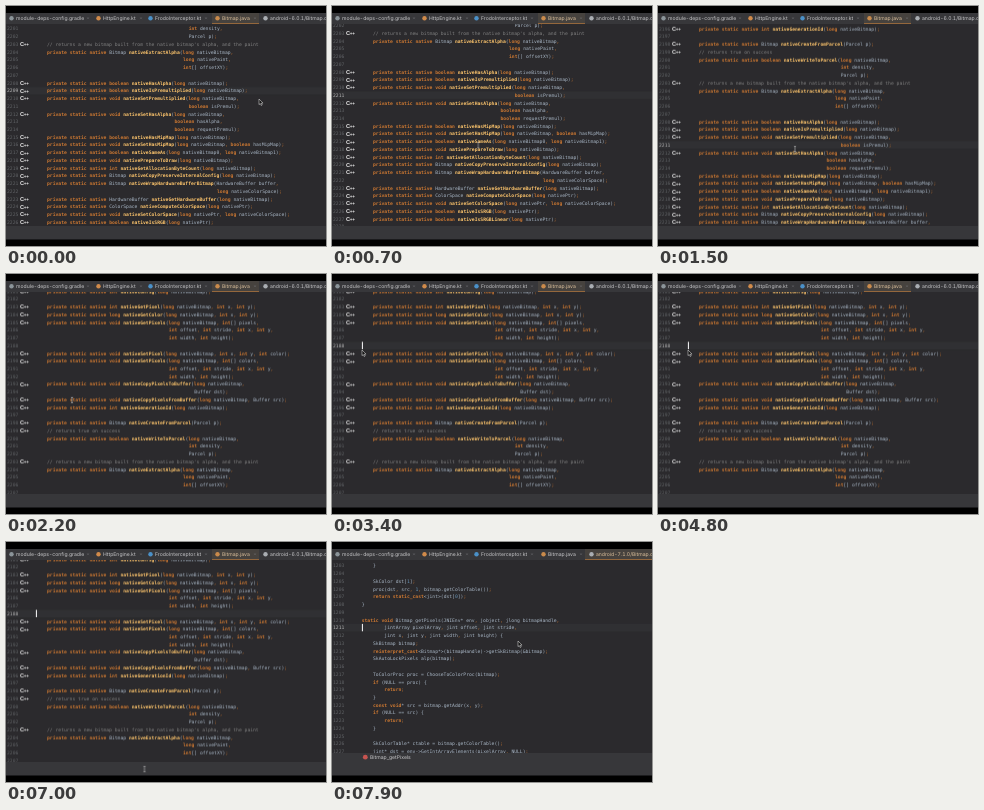
Recreate the animation shown at these times as an HTML page. Size 320 by 240 pixels, loop 8 s.

```html
<!DOCTYPE html>
<html lang="en">
<head>
<meta charset="utf-8">
<title>Code editor</title>
<style>
html, body { margin: 0; width: 100%; height: 100%; overflow: hidden; background: #000; }
svg { display: block; width: 100vw; height: 100vh; }
text { text-rendering: geometricPrecision; fill: #a9b7c6; }
.mono { font: 4.706px "DejaVu Sans Mono", monospace; }
.ui text { font: 5.1px Inter, Roboto, sans-serif; font-variant-numeric: tabular-nums; fill: #c8c8ca; }
.ui .item { font-size: 5.5px; }
.ui .active { fill: #dcc09c; }
.num { fill: #606366; }
.key { fill: #cc7832; font-weight: bold; }
.sep { fill: #cc7832; }
.fn { fill: #ffc66d; font-weight: bold; }
.rem { fill: #808080; }
.lit { fill: #6897bb; }
.cpp { font: bold 5.6px "Liberation Sans", sans-serif; letter-spacing: -.3px; fill: #eee; }
.plus { font-size: 4.6px; }

#scroll, #row, #caret, #pick, #mouse, #popup, .before, .after, .arrow, .beam, .num {
  animation: 8s linear infinite;
}
#row, #caret, #popup, .before, .after, .arrow, .beam, .num { animation-timing-function: step-end; }
#scroll { animation-name: scroll; }
#row { animation-name: row; }
#caret { animation-name: caret; }
#popup { animation-name: popup; }
#pick { animation-name: pick; }
#mouse { animation-name: mouse; }
.before { animation-name: before; }
.after { animation-name: after; }
.arrow { animation-name: arrow; }
.beam { animation-name: beam; }

@keyframes scroll {
  0%, 3.75% { transform: translateY(-130.4px); animation-timing-function: ease-in-out; }
  10%, 14% { transform: translateY(-142.4px); animation-timing-function: ease-in-out; }
  26.25%, 100% { transform: translateY(19px); }
}
@keyframes row {
  0% { transform: translateY(216.7px); }
  6.25% { transform: translateY(232.2px); }
  37.5%, 100% { transform: translateY(54.2px); }
}
@keyframes line2209 { 0% { fill: #b4b4b4; } 6.25%, 100% { fill: #606366; } }
@keyframes line2211 { 0% { fill: #606366; } 6.25% { fill: #b4b4b4; } 37.5%, 100% { fill: #606366; } }
@keyframes line2188 { 0% { fill: #606366; } 37.5%, 100% { fill: #b4b4b4; } }
@keyframes line1211 { 0%, 100% { fill: #b4b4b4; } }
@keyframes caret { 0% { opacity: 0; } 37.5%, 100% { opacity: 1; } }
@keyframes popup { 0% { opacity: 0; } 62.5% { opacity: 1; } 81.25%, 100% { opacity: 0; } }
@keyframes pick {
  0%, 73.75% { transform: none; animation-timing-function: steps(8); }
  78.75%, 100% { transform: translateY(70.56px); }
}
@keyframes before { 0% { opacity: 1; } 88.75%, 100% { opacity: 0; } }
@keyframes after { 0% { opacity: 0; } 88.75%, 100% { opacity: 1; } }
@keyframes arrow { 0% { opacity: 1; } 5% { opacity: 0; } 32.5% { opacity: 1; } 82.5% { opacity: 0; } 88.75%, 100% { opacity: 1; } }
@keyframes beam { 0% { opacity: 0; } 5% { opacity: 1; } 32.5% { opacity: 0; } 82.5% { opacity: 1; } 88.75%, 100% { opacity: 0; } }
@keyframes mouse {
  0%, 3.75% { transform: translate(253px, 93px); animation-timing-function: ease-in-out; }
  10%, 25% { transform: translate(137px, 143px); animation-timing-function: ease-in-out; }
  27.5%, 30% { transform: translate(66px, 126px); animation-timing-function: ease-in-out; }
  36.25%, 62.5% { transform: translate(30px, 76px); animation-timing-function: ease-in-out; }
  70%, 73.1% { transform: translate(145px, 96px); animation-timing-function: ease-in-out; }
  78.75%, 81.25% { transform: translate(146px, 161px); animation-timing-function: ease-in-out; }
  86.25%, 88% { transform: translate(138.5px, 227px); }
  90% { transform: translate(182px, 160px); animation-timing-function: ease-out; }
  97.5%, 100% { transform: translate(186px, 99px); }
}
</style>
</head>
<body>
<svg viewBox="0 0 320 240">
  <defs>
    <clipPath id="pane"><rect y="18" width="320" height="202"/></clipPath>
    <clipPath id="shortPane"><rect y="18" width="320" height="193"/></clipPath>
    <clipPath id="window"><rect y="7" width="320" height="226.5"/></clipPath>
  </defs>
  <rect width="320" height="240" fill="#000"/>
  <rect y="7" width="320" height="226.5" fill="#37373a"/>
  <rect y="18" width="320" height="202" fill="#2b2a2d"/>

  <g class="before" clip-path="url(#pane)">
    <g id="scroll" class="mono">
      <g id="row">
        <rect y="-5.5" width="320" height="7.74" fill="#303033"/>
        <rect id="caret" x="29.9" y="-5.4" width="1" height="7.4" fill="#fff"/>
      </g>
      <g id="java"></g>
    </g>
  </g>
  <g class="after">
    <g class="mono" clip-path="url(#shortPane)">
      <rect y="81.8" width="320" height="7.74" fill="#303033"/>
      <rect x="29.9" y="81.9" width="1" height="7.4" fill="#fff"/>
      <g id="native"></g>
    </g>
    <g class="ui">
      <rect y="211" width="320" height="9" fill="#37373a"/>
      <circle cx="33.3" cy="215.2" r="2.4" fill="#c75450"/>
      <text x="38" y="217">Bitmap_getPixels</text>
    </g>
  </g>

  <g id="tabs" class="ui" clip-path="url(#window)">
    <g class="before">
      <rect x="206" y="7" width="47" height="11" fill="#46423e"/>
      <rect x="206" y="17" width="47" height=".8" fill="#a8713c"/>
    </g>
    <g class="after">
      <rect x="253" y="7" width="67" height="11" fill="#46423e"/>
      <rect x="253" y="17" width="67" height=".8" fill="#a8713c"/>
    </g>
  </g>

  <g id="popup" class="ui" clip-path="url(#window)">
    <rect x="122.8" y="75.8" width="61.4" height="170" fill="#3b3c40" stroke="#525357" stroke-width=".5"/>
    <rect x="123" y="76" width="61" height="10.6" fill="#46474b"/>
    <rect id="pick" x="123.5" y="86.8" width="54.5" height="8.82" fill="#2659c6"/>
    <text x="153.7" y="82.9" text-anchor="middle">Choose Version</text>
  </g>

  <g id="mouse">
    <path class="arrow" d="M0 0V5.6L1.3 4.5L2.2 6.5L3.2 6L2.3 4.1H4Z" fill="#111" stroke="#eee" stroke-width=".5"/>
    <path class="beam" d="M-1.1-2.8Q0-2.8 0-2.1Q0-2.8 1.1-2.8M0-2.1V2.4M-1.1 3Q0 3 0 2.3Q0 3 1.1 3" fill="none" stroke="#c4c4c4" stroke-width=".6"/>
  </g>
</svg>
<script>
const PITCH = 7.74, CHAR = 2.833, LEFT = 29.7;

// "#" opens a native declaration, "~" aligns with the parenthesis above.
const javaCode = `#int nativeConfig(long nativeBitmap);

#int nativeGetPixel(long nativeBitmap, int x, int y);
#long nativeGetColor(long nativeBitmap, int x, int y);
#void nativeGetPixels(long nativeBitmap, int[] pixels,
~int offset, int stride, int x, int y,
~int width, int height);

#void nativeSetPixel(long nativeBitmap, int x, int y, int color);
#void nativeSetPixels(long nativeBitmap, int[] colors,
~int offset, int stride, int x, int y,
~int width, int height);
#void nativeCopyPixelsToBuffer(long nativeBitmap,
~Buffer dst);
#void nativeCopyPixelsFromBuffer(long nativeBitmap, Buffer src);
#int nativeGenerationId(long nativeBitmap);

#Bitmap nativeCreateFromParcel(Parcel p);
    // returns true on success
#boolean nativeWriteToParcel(long nativeBitmap,
~int density,
~Parcel p);
    // returns a new bitmap built from the native bitmap's alpha, and the paint
#Bitmap nativeExtractAlpha(long nativeBitmap,
~long nativePaint,
~int[] offsetXY);

#boolean nativeHasAlpha(long nativeBitmap);
#boolean nativeIsPremultiplied(long nativeBitmap);
#void nativeSetPremultiplied(long nativeBitmap,
~boolean isPremul);
#void nativeSetHasAlpha(long nativeBitmap,
~boolean hasAlpha,
~boolean requestPremul);
#boolean nativeHasMipMap(long nativeBitmap);
#void nativeSetHasMipMap(long nativeBitmap, boolean hasMipMap);
#boolean nativeSameAs(long nativeBitmap0, long nativeBitmap1);
#void nativePrepareToDraw(long nativeBitmap);
#int nativeGetAllocationByteCount(long nativeBitmap);
#Bitmap nativeCopyPreserveInternalConfig(long nativeBitmap);
#Bitmap nativeWrapHardwareBufferBitmap(HardwareBuffer buffer,
~long nativeColorSpace);
#HardwareBuffer nativeGetHardwareBuffer(long nativeBitmap);
#ColorSpace nativeComputeColorSpace(long nativePtr);
#void nativeSetColorSpace(long nativePtr, long nativeColorSpace);
#boolean nativeIsSRGB(long nativePtr);
#boolean nativeIsSRGBLinear(long nativePtr);
`;

const nativeCode = `    }

    SkColor dst[1];
    proc(dst, src, 1, bitmap.getColorTable());
    return static_cast<jint>(dst[0]);
}

static void Bitmap_getPixels(JNIEnv* env, jobject, jlong bitmapHandle,
        jintArray pixelArray, jint offset, jint stride,
        jint x, jint y, jint width, jint height) {
    SkBitmap bitmap;
    reinterpret_cast<Bitmap*>(bitmapHandle)->getSkBitmap(&bitmap);
    SkAutoLockPixels alp(bitmap);

    ToColorProc proc = ChooseToColorProc(bitmap);
    if (NULL == proc) {
        return;
    }
    const void* src = bitmap.getAddr(x, y);
    if (NULL == src) {
        return;
    }

    SkColorTable* ctable = bitmap.getColorTable();
    jint* dst = env->GetIntArrayElements(pixelArray, NULL);`;

const byId = id => document.getElementById(id);

function add(parent, tag, attrs, content = "") {
  const el = document.createElementNS("http://www.w3.org/2000/svg", tag);
  for (const name in attrs) el.setAttribute(name, attrs[name]);
  el.textContent = content;
  return parent.appendChild(el);
}

const tokens = /(\/\/.*)|\b(private|static|native|void|int|long|boolean|const|if|return|static_cast|reinterpret_cast)\b|(native\w+(?=\())|\b(\d+)\b|([,;])|[^\s\w]|\w+|\s+/g;
const kinds = ["", "rem", "key", "fn", "lit", "sep"];

function drawCode(parent, source, first, top) {
  let paren = 0, commented = false;
  source.split("\n").forEach((raw, i) => {
    const y = top + i * PITCH, number = first + i;
    let line = raw.replace(/^#/, "    private static native ");
    if (raw[0] === "~") line = " ".repeat(paren) + raw.slice(1);
    else paren = line.indexOf("(") + 1;
    const body = line.trimStart(), comment = body.startsWith("//");

    add(parent, "text", { x: 1, y, class: "num", style: `animation-name: line${number}` }, number);
    // A commented declaration carries its marker on the comment line.
    if (comment || raw[0] === "#" && !commented) {
      const marker = add(parent, "text", { x: 14, y: y + .3, class: "cpp" }, "C");
      add(marker, "tspan", { class: "plus" }, "++");
    }
    commented = comment;

    const text = add(parent, "text", { x: LEFT + (line.length - body.length) * CHAR, y });
    for (const m of body.matchAll(tokens)) {
      const kind = kinds.findIndex((_, k) => k && m[k]);
      add(text, "tspan", { class: kinds[kind] || "" }, m[0]);
    }
  });
}

drawCode(byId("java"), javaCode, 2181, 0);
drawCode(byId("native"), nativeCode, 1203, 25.4);

function drawTab(x, title, color, closeX, phases = [["", ""]]) {
  for (const [phase, state] of phases) {
    const tab = add(byId("tabs"), "g", { class: phase });
    add(tab, "circle", { cx: x - 4.5, cy: 12.2, r: 2.2, fill: color });
    add(tab, "text", { x, y: 13.9, class: state }, title);
    if (closeX) add(tab, "path", {
      d: `M${closeX - .9} 11.3l1.8 1.8m0-1.8l-1.8 1.8`, stroke: "#77787b", "stroke-width": .4
    });
  }
}

drawTab(10, "module-deps-config.gradle", "#8b9499", 82);
drawTab(97, "HttpEngine.kt", "#d08a4a", 135);
drawTab(149, "FrodoInterceptor.kt", "#4a90c8", 200);
drawTab(216, "Bitmap.java", "#c98a4b", 249, [["before", "active"], ["after", ""]]);
drawTab(264, "android-6.0.1/Bitmap.cpp", "#a9adb2", 0, [["before", ""]]);
drawTab(264, "android-7.1.0/Bitmap.cpp", "#a9adb2", 0, [["after", "active"]]);

"12.0.0 11.0.0 10.0.0 9.0.0 8.1.0 8.0.0 7.1.2 7.1.1 7.1.0 7.0.0 6.0.1 6.0.0 5.1.1 5.1.0 5.0.2 5.0.1 5.0.0"
  .split(" ")
  .forEach((v, i) => add(byId("popup"), "text", { class: "item", x: 125.7, y: 93.1 + i * 8.82 }, "android-" + v));
</script>
</body>
</html>
```
